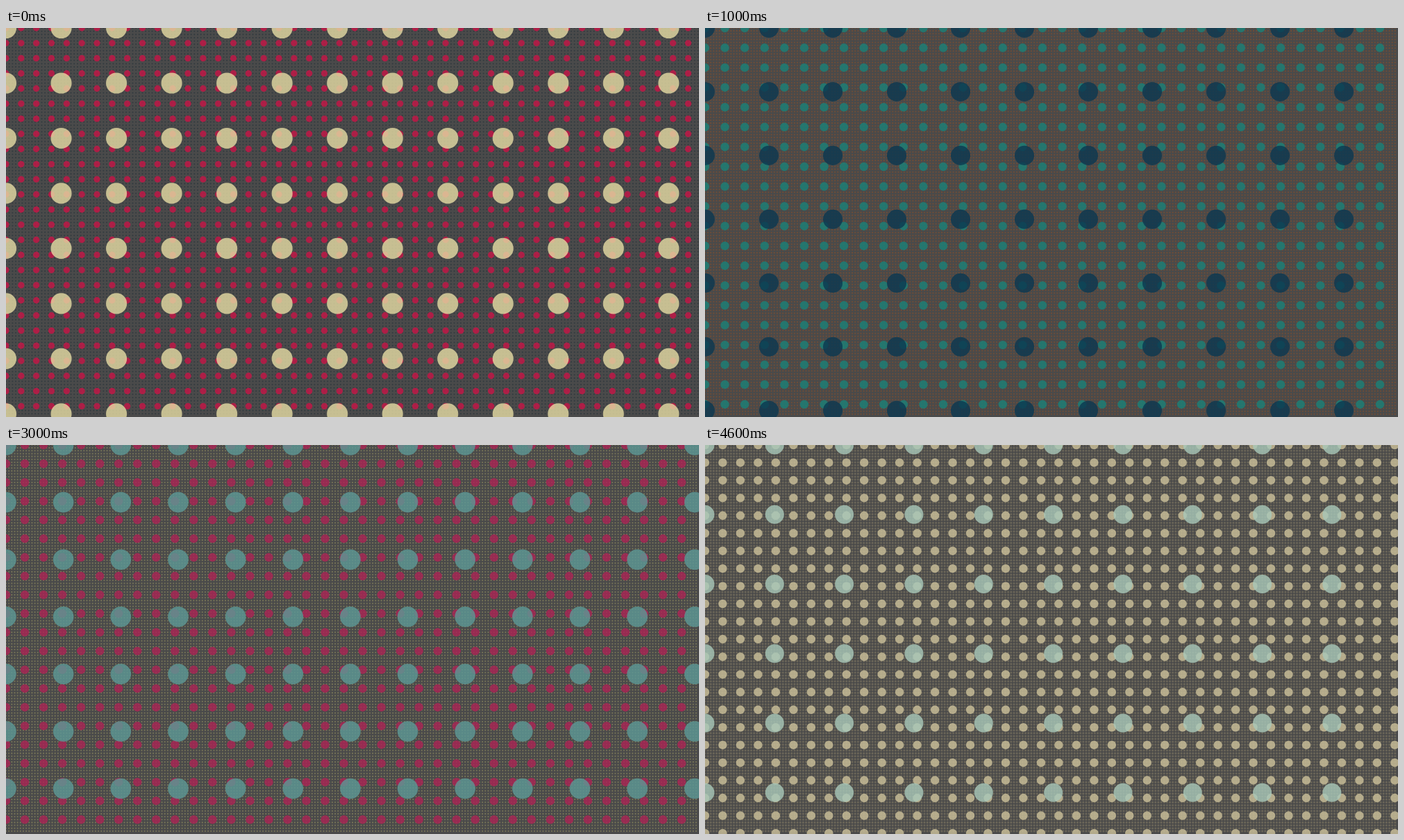
Recreate the animation shown at these times as an HTML page with a canvas. Size 998 by 561 pixels, loop 5 s.

```html
<!DOCTYPE html>
<html lang="en">
<head>
<meta charset="utf-8">
<title>Dot grids</title>
<style>
html, body { margin: 0; width: 100%; height: 100%; overflow: hidden; background: #4a4a4a; }
canvas { display: block; }
</style>
</head>
<body>
<canvas id="stage" width="998" height="561"></canvas>
<script>
const W = 998, H = 561, HOLD = 1000;
const FULL_W = 1920, FULL_H = 1080; // the grids are laid out at this size
const ctx = document.getElementById('stage').getContext('2d');

// Each scene stacks three grids: [pitch, radius, colour]
const scenes = [
  [[9, 2, 'rgb(44,54,60)'], [42, 9, 'rgb(199,21,71)'], [153, 29, 'rgb(231,221,164)']],
  [[8, 2, 'rgb(125,78,48)'], [55, 12, 'rgb(26,129,120)'], [177, 27, 'rgb(11,56,81)']],
  [[8, 2, 'rgb(108,106,52)'], [55, 9, 'rgb(166,179,154)'], [200, 26, 'rgb(34,34,41)']],
  [[8, 2, 'rgb(134,130,92)'], [52, 12, 'rgb(171,36,84)'], [159, 28.5, 'rgb(93,153,150)']],
  [[8, 3, 'rgb(114,108,92)'], [49, 12, 'rgb(206,194,156)'], [193, 26, 'rgb(169,201,186)']]
];

function drawGrid(g, [pitch, radius, colour]) {
  g.fillStyle = colour;
  for (let y = 0; y < FULL_H; y += pitch) {
    g.beginPath();
    for (let x = 0; x < FULL_W; x += pitch) {
      g.moveTo(x + radius, y);
      g.arc(x, y, radius, 0, Math.PI * 2);
    }
    g.fill();
  }
}

function render(layers) {
  const sheet = document.createElement('canvas');
  sheet.width = W;
  sheet.height = H;
  const g = sheet.getContext('2d');
  g.fillStyle = '#4a4a4a';
  g.fillRect(0, 0, W, H);
  g.scale(W / FULL_W, H / FULL_H);
  g.globalAlpha = 0.8;
  layers.forEach(layer => drawGrid(g, layer));
  return sheet;
}

const sheets = scenes.map(render);
const start = performance.now();
let shown = -1;

function tick() {
  const i = Math.floor((performance.now() - start) / HOLD) % sheets.length;
  if (i !== shown) {
    ctx.drawImage(sheets[i], 0, 0);
    shown = i;
  }
  requestAnimationFrame(tick);
}
tick();
</script>
</body>
</html>
```
